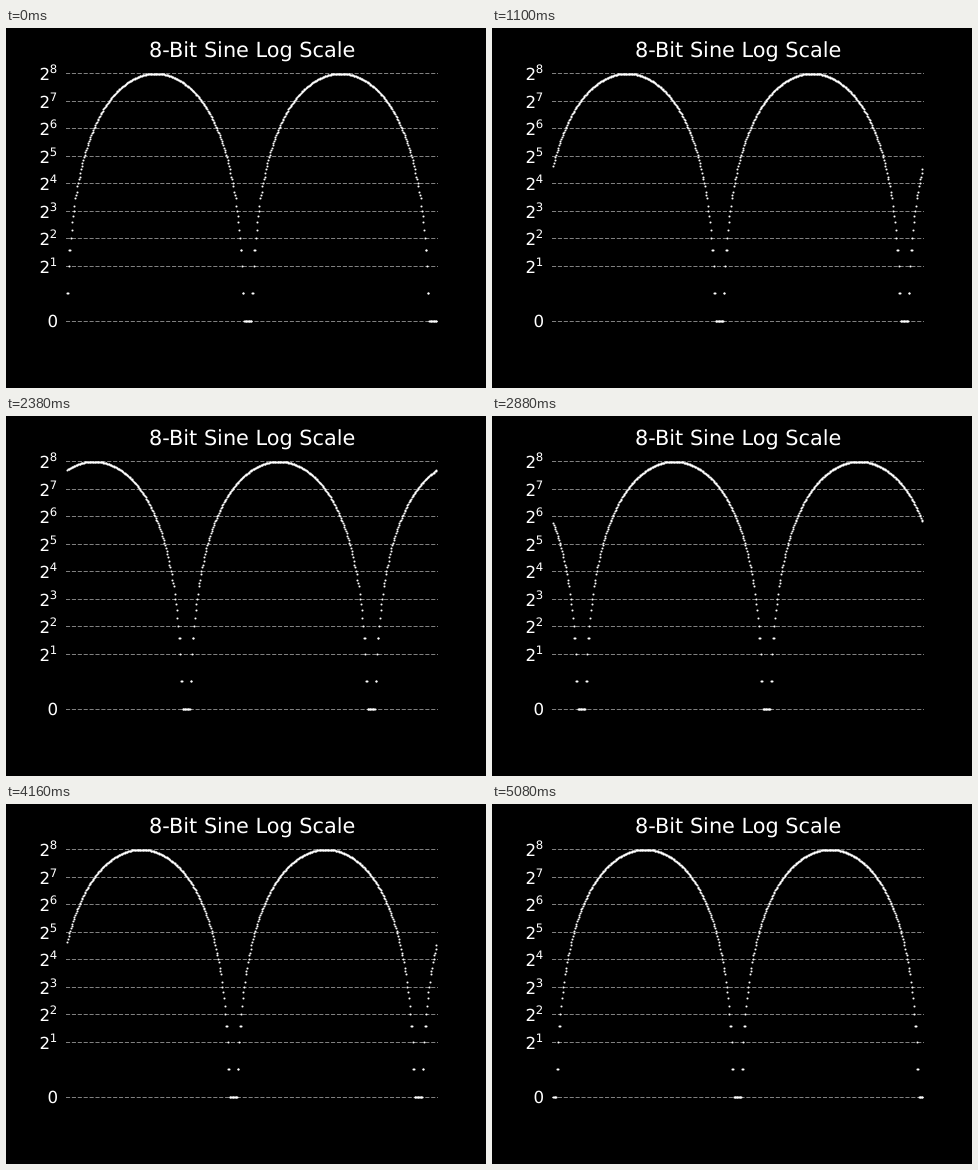
An HTML page with a canvas that plays this animation: 480x360 px, repeating every 5100 ms.

```html
<!DOCTYPE html>
<html lang="en">
<head>
<meta charset="utf-8">
<title>8-Bit Sine Log Scale</title>
<style>
  html, body { margin: 0; width: 100%; height: 100%; overflow: hidden; background: #000; }
  canvas, svg { position: absolute; left: 0; top: 0; width: 480px; height: 360px; }
  text {
    fill: #fff; font-family: "DejaVu Sans", sans-serif; font-size: 16.67px;
    text-rendering: geometricPrecision;
  }
  .title { font-size: 20.83px; text-anchor: middle; }
  .sup { font-size: 11.67px; }
</style>
</head>
<body>
<canvas id="plot" width="480" height="360"></canvas>
<svg id="labels" viewBox="0 0 480 360">
  <text class="title" x="246.2" y="29">8-Bit Sine Log Scale</text>
</svg>
<script>
const ctx = document.getElementById("plot").getContext("2d");
const labels = document.getElementById("labels");

const LEFT = 60, RIGHT = 432;
const PERIOD = 255, SAMPLES = 510, STEP = 5;
const FRAME_MS = 20, FRAMES = 255;
const LEVELS = [8, 7, 6, 5, 4, 3, 2, 1, -1];

const snap = v => Math.floor(v + 0.5) + 0.5;
const levelY = level => 45.33 + 27.52 * (8 - level);
const sampleX = i => 61.2 + i * 370 / SAMPLES;

function sine8(k) {
  return Math.floor(255 * Math.sin(Math.PI * k / PERIOD) ** 2);
}

function addText(str, x, y, cls) {
  const el = document.createElementNS("http://www.w3.org/2000/svg", "text");
  el.setAttribute("x", x);
  el.setAttribute("y", y);
  if (cls) el.setAttribute("class", cls);
  el.textContent = str;
  labels.appendChild(el);
}

for (const level of LEVELS) {
  const y = Math.round(levelY(level));
  if (level < 0) {
    addText("0", 41.6, y + 6);
  } else {
    addText("2", 33.4, y + 6.5);
    addText(level, 43.8, y, "sup");
  }
}

function drawGrid() {
  ctx.strokeStyle = "#808080";
  ctx.lineWidth = 1.11;
  ctx.setLineDash([4.11, 1.78]);
  for (const level of LEVELS) {
    const y = snap(levelY(level));
    ctx.beginPath();
    ctx.moveTo(LEFT, y);
    ctx.lineTo(RIGHT, y);
    ctx.stroke();
  }
}

function draw(frame) {
  ctx.fillStyle = "#000";
  ctx.fillRect(0, 0, 480, 360);
  drawGrid();
  ctx.fillStyle = "#fff";
  for (let i = 0; i < SAMPLES; i++) {
    const v = sine8((i + 6 + STEP * frame) % PERIOD);
    // zero has no logarithm, so it sits one octave below 2^0
    const y = levelY(v ? Math.log2(v) : -1);
    ctx.beginPath();
    ctx.arc(snap(sampleX(i)), snap(y), 1.04, 0, 2 * Math.PI);
    ctx.fill();
  }
}

const start = performance.now();
let last = -1;
function tick() {
  const elapsed = Math.max(0, performance.now() - start);
  const frame = Math.floor(elapsed / FRAME_MS) % FRAMES;
  if (frame !== last) draw(last = frame);
  requestAnimationFrame(tick);
}
tick();
</script>
</body>
</html>
```
